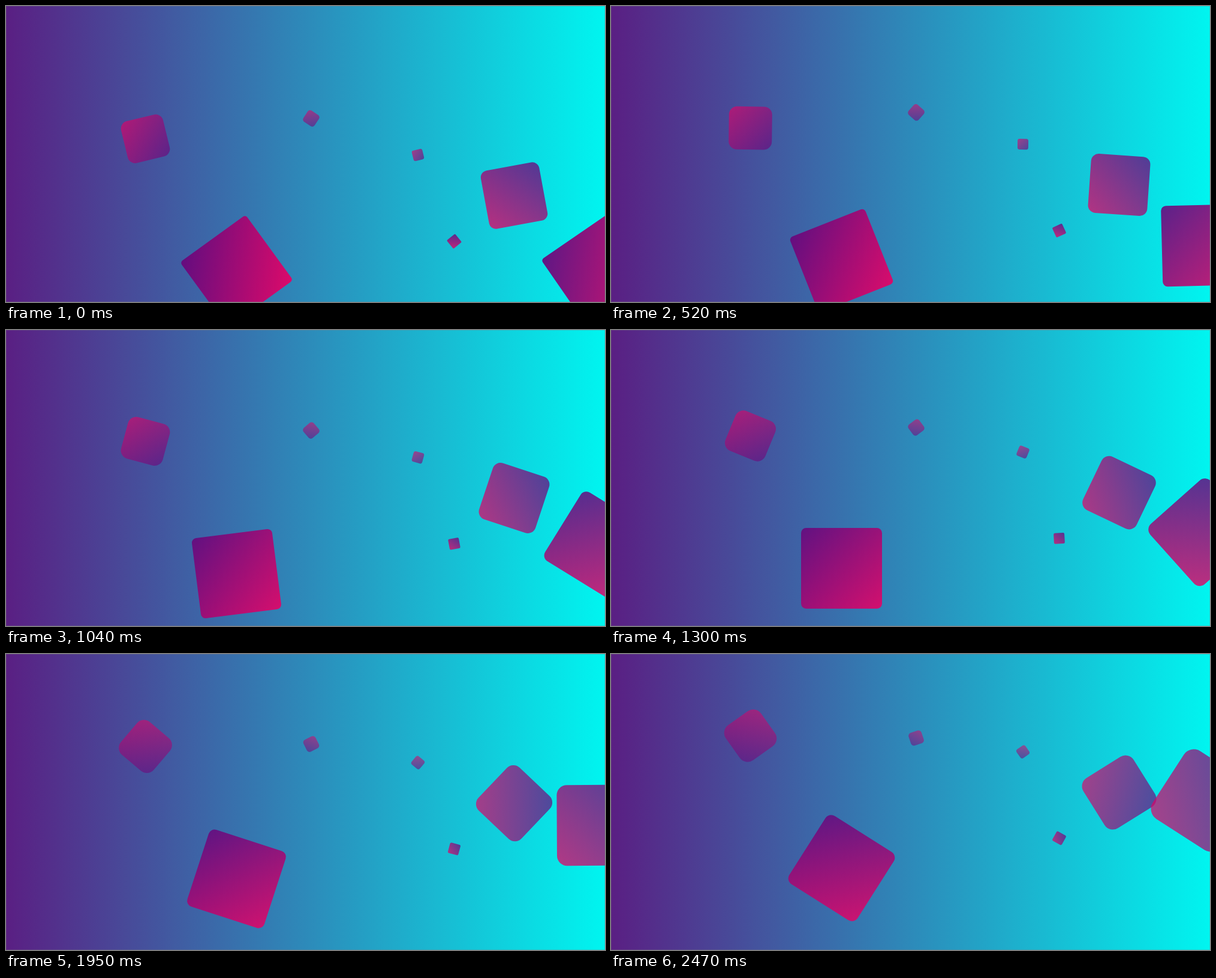
Animation of 999x495 px, one loop 2.6 s. Source, as an HTML page with a canvas:

```html
<!DOCTYPE html>
<html>
<head>
<meta charset="utf-8">
<title>Floating squares</title>
<style>
  html, body { margin: 0; width: 100%; height: 100%; overflow: hidden; }
  canvas { display: block; }
</style>
</head>
<body>
<canvas id="stage" width="999" height="495"></canvas>
<script>
const W = 999, H = 495, LOOP = 2600, STEP = 130;
const FLOOR = 578.5, RISE = 900;   // starting bottom edge and full climb in px
const ctx = document.getElementById('stage').getContext('2d');

// x: centre, start: part of the climb done at time 0, period: full climb in s
const squares = [
  { x: 232.5, size: 72,   start: .356,  period: 26 },
  { x: 687,   size: 18,   start: .356,  period: 26 },
  { x: 747.5, size: 18,   start: .1956, period: 26 },
  { x: 847.5, size: 99,   start: .2355, period: 26 },
  { x: 384.5, size: 135,  start: .075,  period: 26 },
  { x: 509,   size: 22.5, start: .4214, period: 46.8 },
  { x: 986.2, size: 135,  start: .077,  period: 11.3 }
];

function blend(x0, y0, x1, y1, from, to) {
  const g = ctx.createLinearGradient(x0, y0, x1, y1);
  g.addColorStop(0, from);
  g.addColorStop(1, to);
  return g;
}

const sky = blend(0, 0, W, 0, 'rgb(90,31,131)', 'rgb(0,245,240)');

// Each square climbs, spins twice, rounds off and fades as it goes.
function drawSquare({ x, size, start, period }, seconds) {
  const p = start + seconds / period, h = size / 2;
  ctx.save();
  ctx.translate(x, FLOOR - h - RISE * p);
  ctx.rotate(4 * Math.PI * p);
  ctx.globalAlpha = 1 - p;
  ctx.fillStyle = blend(-h, h, h, -h, 'rgb(102,6,124)', 'rgb(234,0,100)');
  ctx.beginPath();
  ctx.roundRect(-h, -h, size, size, h * p);
  ctx.fill();
  ctx.restore();
}

const begin = performance.now();

function frame() {
  const t = (performance.now() - begin) % LOOP;
  const seconds = Math.floor(t / STEP) * STEP / 1000;
  ctx.fillStyle = sky;
  ctx.fillRect(0, 0, W, H);
  squares.forEach(s => drawSquare(s, seconds));
  // faint rim of the stage
  ctx.strokeStyle = 'rgba(128,128,128,.25)';
  ctx.strokeRect(.5, .5, W - 1, H - 1);
  requestAnimationFrame(frame);
}
frame();
</script>
</body>
</html>
```
